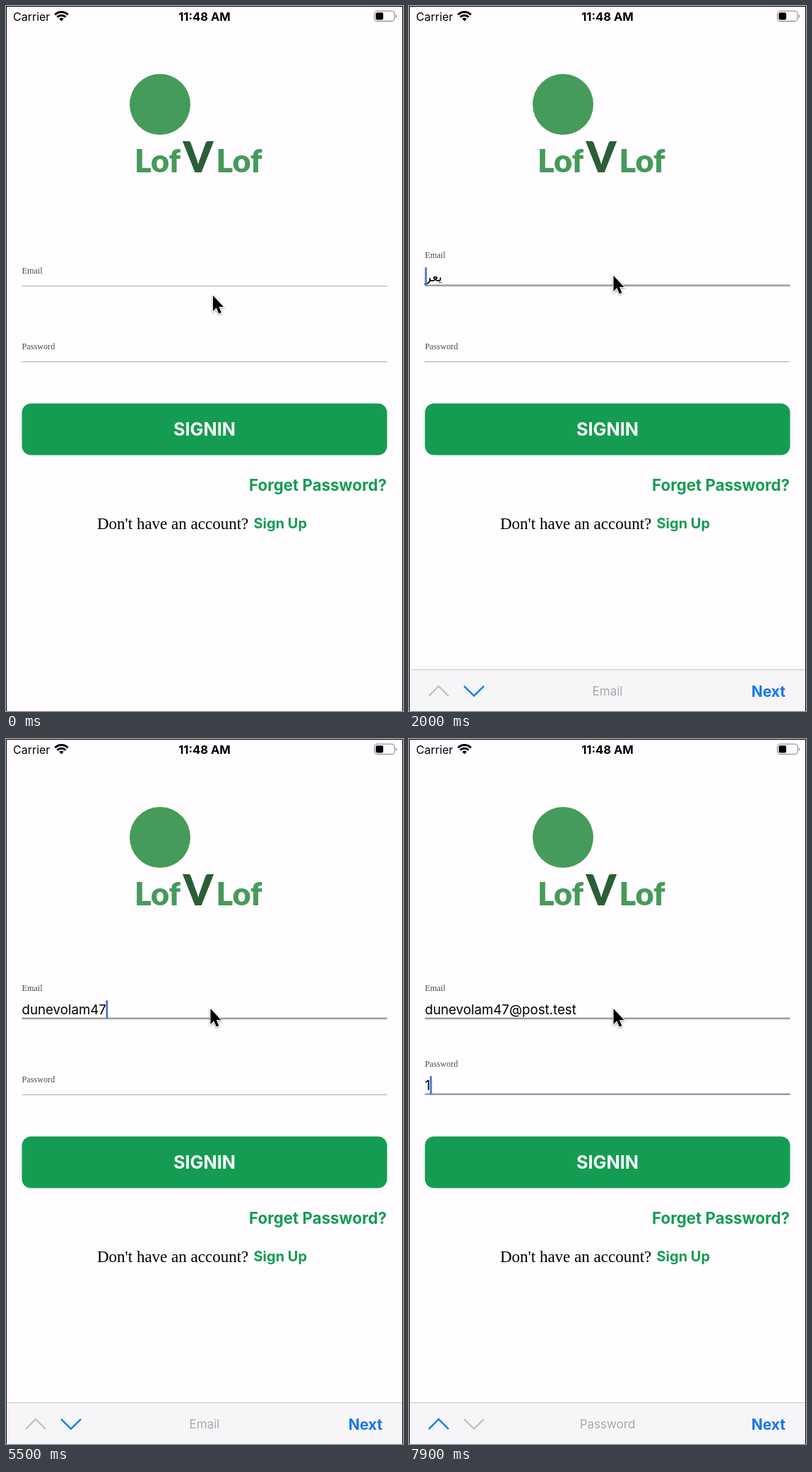
Write an HTML page that moves like this. It is 562x996 px and loops after 8000 ms.

```html
<!DOCTYPE html>
<html lang="en">
<head>
<meta charset="utf-8">
<title>Sign in</title>
<style>
  html, body { margin: 0; width: 100%; height: 100%; overflow: hidden; background: #fffdff; }
  svg { display: block; width: 562px; height: 996px; font-family: Inter, "DejaVu Sans", sans-serif; }
  .serif { font-family: "Liberation Serif", "Times New Roman", serif; }
  .label { font-size: 12.2px; fill: #4c4c50; }
  .typed { font-size: 18.7px; }
  .bold { font-weight: 700; }
  .green { fill: #159c53; }
  .mark { font-family: Lato, sans-serif; font-weight: 900; }
  .stroke { fill: none; stroke-width: 2.4; }
</style>
</head>
<body>
<svg viewBox="0 0 562 996">
  <rect width="562" height="996" fill="#fffdff"/>

  <!-- status bar -->
  <text x="10" y="21" font-size="16">Carrier</text>
  <g transform="translate(78.5 21.5)">
    <path d="M0 0L-3.2 -3.4A4.6 4.6 0 0 1 3.2 -3.4Z"/>
    <path d="M-5.9 -5.9A8.3 8.3 0 0 1 5.9 -5.9M-9.2 -9.2A13 13 0 0 1 9.2 -9.2" fill="none" stroke="#000" stroke-width="3"/>
  </g>
  <text class="bold" x="281" y="21" font-size="16.6" text-anchor="middle">11:48 AM</text>
  <rect x="521.5" y="7.2" width="28.5" height="14.3" rx="4" fill="none" stroke="#98979a" stroke-width="1.3"/>
  <rect x="523.5" y="9.2" width="10.5" height="10.3" rx="2"/>
  <path d="M551.6 12a2.6 2.6 0 0 1 0 5Z" fill="#98979a"/>

  <!-- brand -->
  <circle cx="218" cy="139" r="43" fill="#459b59"/>
  <g class="mark" fill="#459b59" text-anchor="middle">
    <text x="214.5" y="235" font-size="45">Lof</text>
    <text x="272" y="235" font-size="60" fill="#2b5e37">V</text>
    <text x="330" y="235" font-size="45">Lof</text>
  </g>

  <g id="fields"></g>

  <rect class="green" x="22.5" y="561.5" width="517" height="73" rx="13"/>
  <text class="bold" x="281" y="607" font-size="25.2" fill="#fff" text-anchor="middle">SIGNIN</text>
  <text class="bold green" x="539" y="685" font-size="22.3" text-anchor="end">Forget Password?</text>
  <text class="serif" x="129" y="739" font-size="23">Don't have an account?</text>
  <text class="bold green" x="350.5" y="738" font-size="20">Sign Up</text>

  <g id="bar">
    <rect y="937" width="562" height="60" fill="#f6f5f7"/>
    <rect y="937" width="562" height="1.2" fill="#cdccd0"/>
    <path id="up" class="stroke" d="M28 974.8L42 961L56 974.8"/>
    <path id="down" class="stroke" d="M78 960.8L92 974.6L106 960.8"/>
    <text id="hint" x="281" y="974" font-size="17" fill="#a9a8ac" text-anchor="middle"></text>
    <text class="bold" x="533" y="976" font-size="21" fill="#1477ef" text-anchor="end">Next</text>
  </g>

  <path id="pointer" d="M0 0V22L4.8 17.3L8.3 25.5L11.8 24L8.4 16H15Z" stroke="#fff" stroke-width="2" paint-order="stroke" style="filter:drop-shadow(0 1px 1.5px #0006)"/>
  <path d="M.5 996V.5H561.5V996" fill="none" stroke="#000"/>
</svg>

<script>
const LOOP = 8000, CLICK = 450, NEXT = 7500;
const $ = id => document.getElementById(id);
const ease = (t, from, to) => {
  const k = Math.min(1, Math.max(0, (t - from) / (to - from)));
  return k * k * (3 - 2 * k);
};

// Wrong keyboard layout first, then a slip, then the address.
const wrong = "يعرث", email = "dunevolam47@post.test";
const edits = [[0, ""]];
[700, 800, 900, 1020].forEach((at, i) => edits.push([at, wrong.slice(0, i + 1)]));
[1900, 2080, 2260, 2440].forEach((at, i) => edits.push([at, wrong.slice(0, 3 - i)]));
edits.push([2700, "h"], [2900, "hl"], [3150, "h"], [3300, ""]);
[3400, 3550, 3750, 3900, 4050, 4220, 4380, 4600, 4850, 5150, 5400, 5700, 5980, 6250,
  6430, 6570, 6700, 6850, 6980, 7130, 7280]
  .forEach((at, i) => edits.push([at, email.slice(0, i + 1)]));
const emailAt = t => edits.filter(e => e[0] <= t).pop()[1];

function makeField(name, y) {
  const g = document.createElementNS("http://www.w3.org/2000/svg", "g");
  g.innerHTML = `<text class="serif label" x="22.5">${name}</text>
    <rect x="22.5" width="517"/>
    <text class="typed" x="22.5" y="${y - 7}"></text>
    <rect y="${y - 27}" width="2.8" height="26" rx="1" fill="#4a73d6"/>`;
  $("fields").append(g);
  const [label, line, typed, caret] = g.children;
  return (rise, text, focused, caretAtStart) => {
    const thick = rise > 0;
    label.setAttribute("y", y - 18.5 - 22 * rise);
    line.setAttribute("y", thick ? y - 2.5 : y - 1);
    line.setAttribute("height", thick ? 2.6 : 1.2);
    line.setAttribute("fill", thick ? "#9f9da2" : "#b3b2b6");
    if (typed.textContent !== text) typed.textContent = text;
    const width = text && !caretAtStart ? typed.getComputedTextLength() : 0;
    caret.setAttribute("x", 22.5 + Math.max(0, width - .5));
    caret.setAttribute("visibility", focused ? "visible" : "hidden");
  };
}
const drawEmail = makeField("Email", 396);
const drawPassword = makeField("Password", 503);

function draw(t) {
  const onPassword = t >= NEXT;
  drawEmail(ease(t, CLICK, CLICK + 150), emailAt(t), t >= CLICK && !onPassword, t < 3150);
  drawPassword(ease(t, NEXT, NEXT + 150), t >= 7800 ? "1" : "", onPassword, false);

  const move = ease(t, 50, 400);
  $("pointer").setAttribute("transform", `translate(${293 - 3.5 * move} ${409 - 28 * move})`);

  $("bar").setAttribute("transform", `translate(0 ${60 * (1 - ease(t, CLICK, CLICK + 250))})`);
  $("hint").textContent = onPassword ? "Password" : "Email";
  $("up").setAttribute("stroke", onPassword ? "#1477ef" : "#c3c2c6");
  $("down").setAttribute("stroke", onPassword ? "#c3c2c6" : "#1477ef");
}

const start = performance.now();
function tick() {
  draw((performance.now() - start) % LOOP);
  requestAnimationFrame(tick);
}
tick();
</script>
</body>
</html>
```
